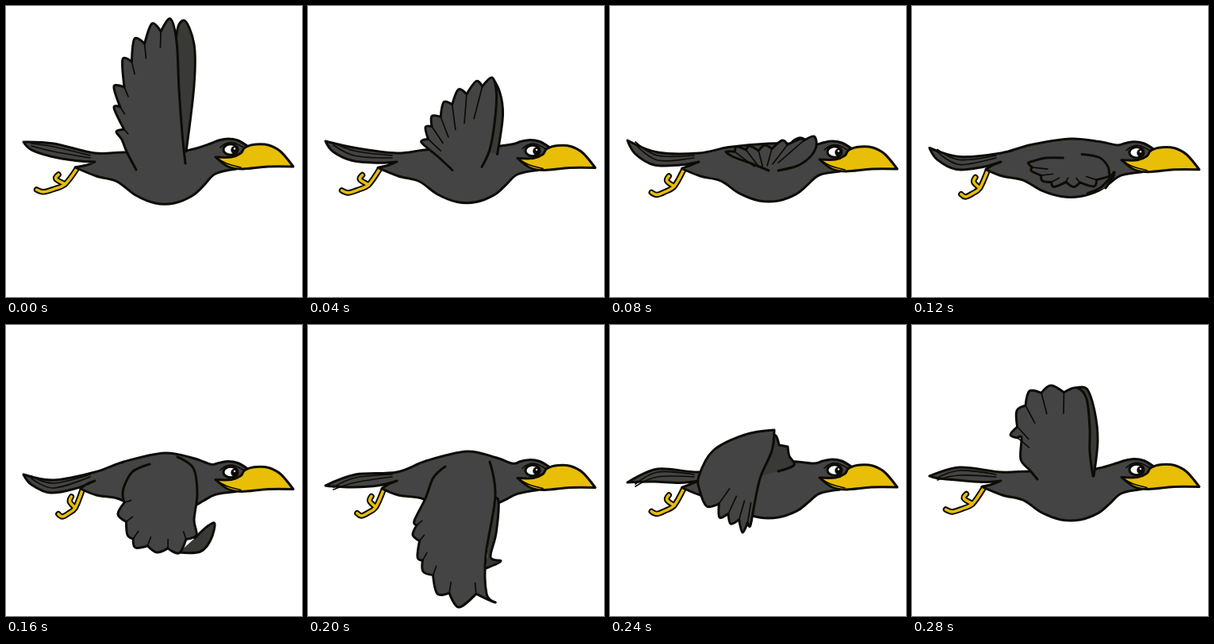
These frames come from a looping animation (373x366 px, 0.32 s). An HTML page:

```html
<!DOCTYPE html>
<html lang="en">
<head>
<meta charset="utf-8">
<title>Flying crow</title>
<style>
html, body { margin: 0; width: 100%; height: 100%; overflow: hidden; background: #fff; }
svg { display: block; width: 100vw; height: 100vh; }
path, ellipse { stroke: #0d0b05; stroke-width: 3; stroke-linejoin: round; stroke-linecap: round; }
.skin { fill: #444; }
.far { fill: #393a37; }
.beak { fill: #e8be06; }
.line { fill: none; stroke-width: 1.7; }
.limb { fill: none; stroke-width: 7.5; }
.shin { fill: none; stroke: #e8be06; stroke-width: 3.6; }
</style>
</head>
<body>
<svg id="stage" viewBox="0 0 373 366"></svg>
<script>
const STEP = 40, COUNT = 8;

// "x y, x y!" to [[x, y], [x, y, true]]; "!" marks a sharp corner.
const points = text => text.split(',').map(s => {
  const [x, y] = s.trim().split(' ').map(parseFloat);
  return s.includes('!') ? [x, y, true] : [x, y];
});

const lerp = (a, b, t) => a + (b - a) * t;
const toward = (p, q, t) => [lerp(p[0], q[0], t), lerp(p[1], q[1], t)];

// Smooth path through all points.
function curve(pts) {
  const slope = i => {
    const a = pts[i - 1], b = pts[i + 1];
    return !a || !b || pts[i][2] ? [0, 0] : [(b[0] - a[0]) / 6, (b[1] - a[1]) / 6];
  };
  return pts.slice(1).reduce((d, q, i) => {
    const p = pts[i], s = slope(i), t = slope(i + 1);
    return d + `C${p[0] + s[0]} ${p[1] + s[1]} ${q[0] - t[0]} ${q[1] - t[1]} ${q[0]} ${q[1]}`;
  }, `M${pts[0][0]} ${pts[0][1]}`);
}

const shape = (name, pts) => `<path class="${name}" d="${curve(pts)}"/>`;

// Halfway between two poses, field by field.
function mix(a, b) {
  if (typeof a === 'number') return (a + b) / 2;
  if (Array.isArray(a)) return a.map((v, i) => mix(v, b[i]));
  return Object.fromEntries(Object.keys(a).map(k => [k, mix(a[k], b[k])]));
}

function head(dy) {
  const part = (name, text) => shape(name, points(text));
  return `<g transform="translate(0 ${dy})">` +
    part('beak', '264 190!, 284 190, 296 185, 301 178, 315 174, 331 175, 346 183, 362 202!, 330 202, 298 205, 280 202, 264 190') +
    part('line', '267 192, 278 198, 296 203') +
    part('line', '270 178, 277 173, 287 172, 301 179') +
    '<ellipse cx="283" cy="180.5" rx="9" ry="6.8" fill="#fff"/>' +
    '<ellipse cx="288" cy="181" rx="3.2" ry="3.6"/>' +
    '<ellipse cx="288" cy="179.5" rx="1.2" ry="1.2" fill="#fff" style="stroke:none"/></g>';
}

function foot([x, y], reach, drop) {
  const at = (u, v) => [x - u * reach, y + v * drop];
  const leg = [at(0, 0), at(.28, .68), at(.55, .9), at(.8, 1.03), at(.97, .93)];
  const claw = [at(.28, .68), at(.5, .45), at(.44, .25)];
  return ['limb', 'shin'].map(c => shape(c, leg) + shape(c, claw)).join('');
}

function body({ dy, back, belly, tip, bend }, hip) {
  const low = t => lerp(214, belly, t);
  const tail = [22, tip, true], under = bend + 16;
  return shape('skin', [
    tail, [60, bend], [112, 185], [150, (back + 182) / 2], [200, back], [236, (back + 174) / 2],
    [258, 173 + dy / 2], [268, 169 + dy], [280, 167 + dy], [292, 169 + dy], [304, 176 + dy, true],
    [290, 205 + dy, true], [264, 211 + dy / 2], [249, low(.35)], [235, low(.72)], [212, belly],
    [188, belly], [163, low(.7)], [140, low(.2)], [114, 214], [hip[0] - 2, hip[1] - 2, true],
    [102, 200], [112, 196, true], [88, (under + 200) / 2], [56, under], [32, lerp(tip, under, .55)], tail
  ]) + [4, 10].map(h => shape('line', [[32, tip + h / 2], [60, bend + h], [106, 186 + h / 2]])).join('');
}

// Feather tips joined by notches that point at the shoulder.
function wing({ trail, tips, lead, root, notch, vein }) {
  const edge = [], veins = [];
  tips.forEach((b, i) => {
    const a = tips[i - 1];
    if (a) {
      const mid = toward(a, b, .5);
      const depth = notch * Math.hypot(a[0] - b[0], a[1] - b[1]);
      const cut = toward(mid, root, depth / Math.hypot(mid[0] - root[0], mid[1] - root[1]));
      edge.push([...cut, true]);
      veins.push([cut, toward(cut, root, vein)]);
    }
    edge.push(b);
  });
  return shape('skin', [...trail, ...edge, ...lead]) + veins.map(v => shape('line', v)).join('');
}

const pose = (dy, back, belly, tip, bend, notch, vein, w) => ({
  dy, back, belly, tip, bend, notch, vein, root: points(w.root)[0],
  trail: points(w.trail), tips: points(w.tips), lead: points(w.lead), far: points(w.far)
});

const up = pose(0, 186, 248, 171, 173, .55, .12, {
  root: '190 200',
  trail: '164 206, 152 183, 146 168',
  tips: '139 158, 136 128, 136 101, 147 67, 162 41, 184 22, 207 16',
  lead: '215 45, 218 105, 222 160, 226 198',
  far: '222 180, 214 50, 224 18, 237 48, 237 100, 227 183'
});
const level = pose(3, 173, 245, 169, 184, .35, .65, {
  root: '195 212',
  trail: '200 207, 178 198, 156 190',
  tips: '146 183, 160 177, 176 176, 195 175, 217 169, 240 167, 257 164',
  lead: '260 176, 252 190, 236 201, 212 207',
  far: '225 185, 228 173, 238 166, 246 168, 254 175, 250 190'
});
const under = pose(4.5, 161, 234, 188, 195, .2, .15, {
  root: '205 205',
  trail: '181 175, 160 184, 150 200',
  tips: '147 212, 141 238, 153 264, 163 280, 190 286, 218 287, 240 264',
  lead: '237 245, 241 212, 236 180, 216 166',
  far: '218 286, 245 285, 258 270, 263 250, 254 253, 238 268'
});
const down = pose(2.5, 159, 230, 202, 188, .3, .1, {
  root: '200 200',
  trail: '173 178, 158 192, 148 218',
  tips: '134 246, 132 264, 138 292, 145 310, 163 338, 190 355, 236 349',
  lead: '225 338, 224 290, 236 215, 229 172',
  far: '232 220, 240 221, 237 262, 230 292, 243 297, 224 306'
});
const fold = pose(2, 170, 242, 198, 181, .6, .25, {
  root: '190 150',
  trail: '207 132, 170 138, 130 158, 112 190, 113 208',
  tips: '122 228, 138 242, 152 250, 167 261, 177 252',
  lead: '183 220, 190 190, 204 158, 207 132',
  far: '190 190, 206 140, 213 151!, 224 153!, 226 165, 232 176, 212 184'
});
const rise = pose(1.5, 186, 245, 190, 179, .22, .25, {
  root: '190 190',
  trail: '158 194, 148 182, 137 169',
  tips: '138 142, 124 138, 132 108, 148 83, 175 76, 208 79',
  lead: '220 93, 224 130, 224 160, 228 190',
  far: '205 80, 220 80, 230 108, 234 145, 229 190'
});
const poses = [up, mix(up, level), level, mix(level, under), under, down, fold, rise];

function draw(p, i) {
  const swing = Math.cos(2 * Math.PI * i / COUNT);
  const hip = [92.5 - 3.5 * swing, 206.5 - 1.5 * swing];
  return foot(hip, 41.5 + 10.5 * swing, 30 - 2 * swing) +
    body(p, hip) + shape('far', p.far) + wing(p) + head(p.dy);
}

const stage = document.getElementById('stage');
stage.innerHTML = poses.map((p, i) => `<g visibility="hidden">${draw(p, i)}</g>`).join('');
const groups = [...stage.children];

function show(time) {
  const now = Math.floor(time / STEP) % COUNT;
  groups.forEach((g, i) => g.setAttribute('visibility', i === now ? 'visible' : 'hidden'));
}

const start = performance.now();
function tick() {
  show(performance.now() - start);
  requestAnimationFrame(tick);
}
tick();
</script>
</body>
</html>
```
